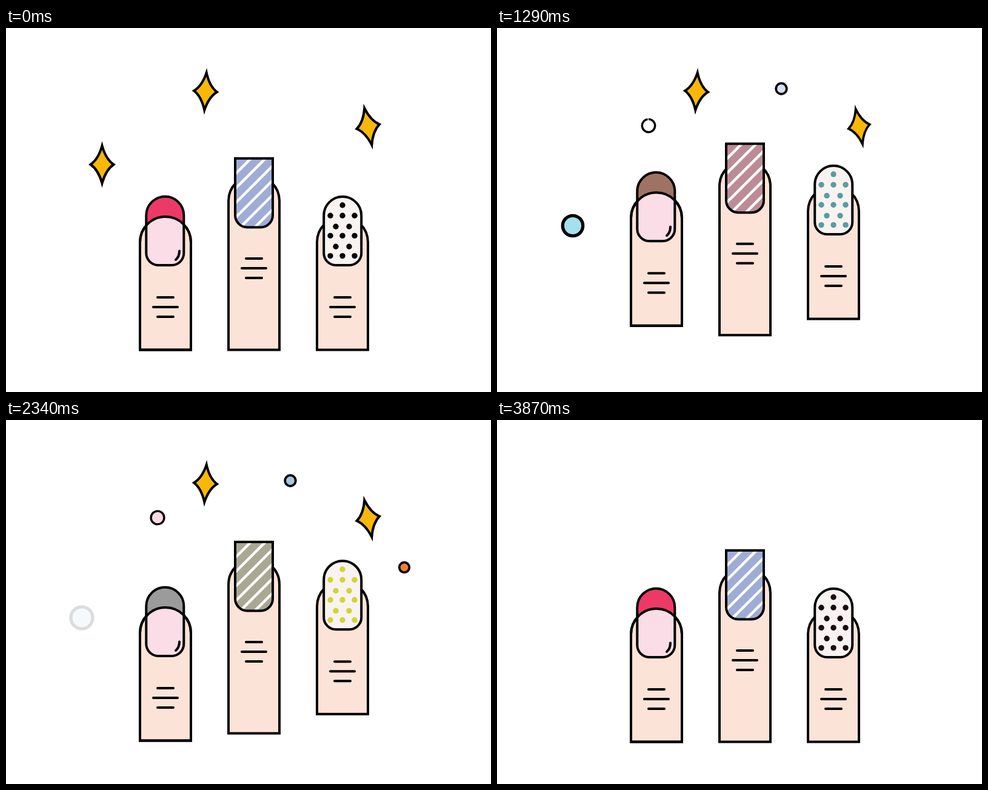
These frames come from a looping animation (800x600 px, 3.9 s). An HTML page:

```html
<!DOCTYPE html>
<html lang="en">
<head>
<meta charset="utf-8">
<title>Nails</title>
<style>
html, body { margin: 0; width: 100%; height: 100%; overflow: hidden; background: #fff; }
svg { display: block; width: 100%; height: 100%; }
.line { fill: none; stroke: #000; stroke-width: 4; }
.round { stroke-linecap: round; }
</style>
</head>
<body>
<svg id="stage" viewBox="0 0 800 600"></svg>
<script>
const LOOP = 3900, STEP = 30;
const stage = document.getElementById('stage');

function add(parent, tag, attrs = {}) {
  const el = document.createElementNS('http://www.w3.org/2000/svg', tag);
  set(el, attrs);
  parent.appendChild(el);
  return el;
}
function set(el, attrs) {
  for (const name in attrs) el.setAttribute(name, attrs[name]);
}
const clamp = x => Math.max(0, Math.min(1, x));
const ease = x => { x = clamp(x); return x * x * (3 - 2 * x); };
const ramp = (t, start, length) => clamp((t - start) / length);

// Finds the two neighbouring keys and the share of the way between them.
function span(times, t) {
  let i = 0;
  while (i < times.length - 2 && t >= times[i + 1]) i++;
  return [i, ramp(t, times[i], times[i + 1] - times[i])];
}

// ---- fingers ----
const SKIN = '#fce3d7';
const LIFTS = [0, 54, 54, 24, 54, 54, 0];
const COLOR_TIMES = [0, 330, 1020, 1530, 2340, 3000, 3870];

const fingerPath = (cx, top) =>
  `M${cx - 42} 530.5V${top + 42}a42 42 0 0 1 84 0V530.5Z`;
const pillPath = (cx, top, bottom) =>
  `M${cx - 31} ${top + 31}a31 31 0 0 1 62 0V${bottom - 20}a20 20 0 0 1-20 20h-22a20 20 0 0 1-20-20Z`;
const squarePath = (cx, top, bottom) =>
  `M${cx - 31} ${top}h62V${bottom - 20}a20 20 0 0 1-20 20h-22a20 20 0 0 1-20-20Z`;

function clip(id, d) {
  add(add(stage, 'clipPath', { id }), 'path', { d });
  return `url(#${id})`;
}

function makeFinger(cx, top, wrinkleY) {
  const group = add(stage, 'g');
  const body = fingerPath(cx, top);
  add(group, 'path', { d: body, fill: SKIN });
  add(group, 'path', { d: body, class: 'line' });
  [[-16, 13], [0, 20], [16, 13]].forEach(([dy, half]) =>
    add(group, 'path', { d: `M${cx - half} ${wrinkleY + dy}h${half * 2}`, class: 'line round' }));
  return { group, body };
}

function makeTipped() {
  const { group, body } = makeFinger(263, 311, 460);
  const pill = pillPath(262.3, 277.8, 391);
  const tip = add(group, 'path', { d: pill });
  add(group, 'path', { d: body, fill: '#fadde6', 'clip-path': clip('tipped', pill) });
  add(group, 'path', { d: body, class: 'line' });
  add(group, 'path', { d: pill, class: 'line' });
  add(group, 'path', { d: 'M286 367.5c0 7-2 11-6 14.500', class: 'line round' });
  return { group, paint: c => set(tip, { fill: c }) };
}

function makeStriped() {
  const { group } = makeFinger(409, 243, 396);
  const nail = squarePath(409, 215, 328.5);
  const base = add(group, 'path', { d: nail });
  const stripes = add(group, 'g', { 'clip-path': clip('striped', nail) });
  for (let k = 0; k < 6; k++) {
    const sum = 619 + 24 * k;
    add(stripes, 'path', { d: `M370 ${sum - 370}L450 ${sum - 450}`, stroke: '#fff', 'stroke-width': 4.4 });
  }
  add(group, 'path', { d: nail, class: 'line' });
  return { group, paint: c => set(base, { fill: c }) };
}

function makeDotted() {
  const { group } = makeFinger(555, 311, 460);
  const nail = pillPath(555.2, 278, 391);
  add(group, 'path', { d: nail, fill: '#f8f3f1' });
  const dots = add(group, 'g');
  const rows = [[292, [0]], [309.3, [-20, 0, 20]], [327.3, [-11, 11]],
    [342.4, [-20, 0, 20]], [360.3, [-11, 11]], [375.6, [-20, 0, 20]]];
  rows.forEach(([cy, xs]) => xs.forEach(x => add(dots, 'circle', { cx: 555 + x, cy, r: 4.7 })));
  add(group, 'path', { d: nail, class: 'line' });
  return { group, paint: c => set(dots, { fill: c }) };
}

const fingers = [
  { ...makeTipped(), times: [0, 270, 950, 1150, 1420, 2100, 2372],
    colors: [0xec3a66, 0xe87fd6, 0x5e4bc4, 0xd6960f, 0x9b9b9b, 0x3dd1dc, 0xec3a66] },
  { ...makeStriped(), times: [88, 361, 1100, 1303, 1573, 2158, 2431],
    colors: [0x9fadd6, 0xa99ec0, 0xbd8a9a, 0xbc8e92, 0xa9a893, 0xa5aea8, 0x9fadd6] },
  { ...makeDotted(), times: [163, 436, 1250, 1452, 1722, 2273, 2546],
    colors: [0x050505, 0x1f456e, 0x5a93c6, 0x55a57f, 0xd3d52f, 0xee6a3c, 0x1a0b0e] }
];

function mix(a, b, p) {
  const channel = shift => {
    const from = a >> shift & 255, to = b >> shift & 255;
    return Math.round(from + (to - from) * p);
  };
  return `rgb(${channel(16)},${channel(8)},${channel(0)})`;
}

function drawFinger({ group, paint, times, colors }, t) {
  const [i, p] = span(times, t);
  const lift = LIFTS[i] + (LIFTS[i + 1] - LIFTS[i]) * ease(p);
  set(group, { transform: `translate(0 ${-lift})` });
  const [c, q] = span(COLOR_TIMES, t);
  paint(mix(colors[c], colors[c + 1], q));
}

// ---- stars: they turn away one after another, then turn back ----
const HIDE = [26, 1079, 2155, 3320], SHOW = [476, 1550, 2674], TURN = 190;
const stars = [
  { x: 158.5, y: 225, angle: 0, delay: 0 },
  { x: 597.3, y: 162.5, angle: -11.3, delay: 180 },
  { x: 329, y: 104.5, angle: 3.2, delay: 360 }
];
for (const star of stars) {
  star.el = add(stage, 'path', {
    d: 'M0-31Q6-9 19 0Q6 9 0 31Q-6 9-19 0Q-6-9 0-31Z',
    fill: '#f8b709', stroke: '#000', 'stroke-width': 4, 'stroke-miterlimit': 12
  });
}

function drawStar({ el, x, y, angle, delay }, t) {
  const turns = starts => starts.reduce((sum, s) => sum + ease(ramp(t, s + delay, TURN)), 0);
  const width = 1 - turns(HIDE) + turns(SHOW);
  const height = 0.62 + 0.38 * width * width;
  set(el, {
    transform: `translate(${x} ${y}) scale(${Math.max(width, 0.001)} ${height}) rotate(${angle})`,
    visibility: width > 0.01 ? 'visible' : 'hidden'
  });
}

// ---- bubbles: drawn as a ring, filled, faded, then burst into rays ----
const DRAW = 400, FADE = 150, BURST = 430;
const bubbles = [
  { x: 125, y: 326, r: 16.2, pulse: 1.9, line: 5.3, fill: '#a3e1ed', start: 230, end: 2360, reach: 27 },
  { x: 469, y: 100, r: 8.8, pulse: 0, line: 3.7, fill: '#a8c5e2', start: 580, end: 2700, reach: 35 },
  { x: 250, y: 161, r: 10.6, pulse: 0.3, line: 3.4, fill: '#fbdae5', start: 925, end: 3040, reach: 27 },
  { x: 657, y: 243, r: 8.3, pulse: 0, pop: 3.6, line: 3.7, fill: '#f07d38', start: 1308, end: 3340, reach: 25 }
];
for (const b of bubbles) {
  const group = add(stage, 'g', { transform: `translate(${b.x} ${b.y})` });
  b.ball = add(group, 'g', { transform: 'rotate(-90)' });
  b.disc = add(b.ball, 'circle', { fill: b.fill });
  b.ring = add(b.ball, 'circle', { fill: 'none', stroke: '#000', 'stroke-width': b.line, pathLength: 1 });
  b.rays = add(group, 'path', { stroke: '#000', 'stroke-width': 2.4, class: 'round' });
}

function rayPath(inner, outer) {
  let d = '';
  for (let k = 0; k < 12; k++) {
    const a = (15 + 30 * k) * Math.PI / 180, c = Math.cos(a), s = Math.sin(a);
    d += `M${c * inner} ${s * inner}L${c * outer} ${s * outer}`;
  }
  return d;
}

function drawBubble(b, t) {
  const age = t - b.start;
  const drawn = ease(age / DRAW);
  const pop = (b.pop || 0) * Math.sin(Math.PI * ramp(age, 420, 360));
  const r = b.r + pop + b.pulse * Math.cos(2 * Math.PI * (t - 1020) / 1300);
  set(b.ball, {
    opacity: clamp((b.end - t) / FADE),
    visibility: drawn > 0 && t < b.end ? 'visible' : 'hidden'
  });
  set(b.disc, { r, opacity: ramp(age, 420, 560) });
  set(b.ring, { r, 'stroke-dasharray': drawn < 1 ? `${drawn} 2` : 'none' });

  const p = ramp(t, b.end, BURST);
  const alive = p > 0 && p < 1;
  set(b.rays, {
    d: alive ? rayPath(b.reach * p ** 0.66, b.reach * (1 - (1 - p) ** 3)) : '',
    visibility: alive ? 'visible' : 'hidden'
  });
}

function render(t) {
  fingers.forEach(f => drawFinger(f, t));
  stars.forEach(s => drawStar(s, t));
  bubbles.forEach(b => drawBubble(b, t));
}

const began = performance.now();
function tick() {
  const elapsed = (performance.now() - began) % LOOP;
  render(Math.floor(elapsed / STEP) * STEP);
  requestAnimationFrame(tick);
}
tick();
</script>
</body>
</html>
```
